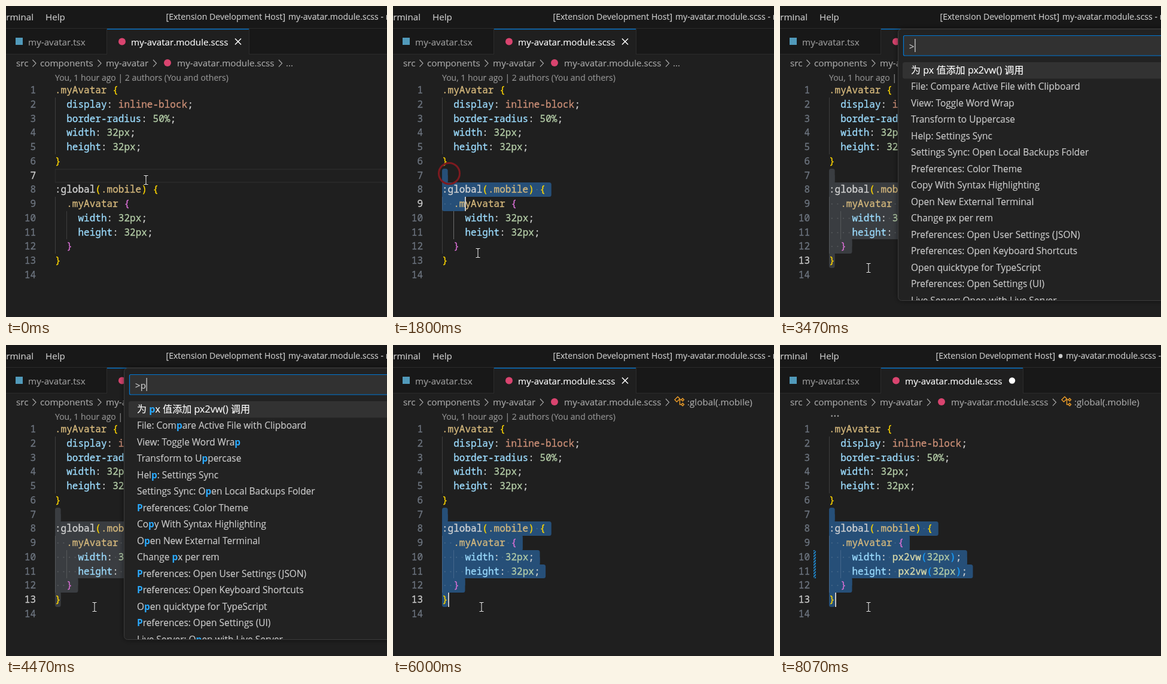
An HTML page for the animation above (8610 ms loop, 637 by 520 pixels).

```html
<!DOCTYPE html>
<html lang="en">
<head>
<meta charset="utf-8">
<title>Command palette demo</title>
<style>
  html, body { margin: 0; width: 100%; height: 100%; overflow: hidden; background: #1f1f1f; }
  svg { display: block; }
  text { white-space: pre; font-family: "Open Sans", "Noto Sans CJK SC", "Noto Sans CJK", sans-serif; font-size: 15.2px; stroke-width: .15px; }
  .code { font-family: "Noto Sans Mono", monospace; font-size: 16.03px; stroke-width: .3px; }
  .hit { fill: #2aaaff; stroke: none; font-weight: 700; }
</style>
</head>
<body>
<svg id="stage" width="637" height="520" viewBox="0 0 637 520">
  <defs>
    <pattern id="stripes" width="3.4" height="3.4" patternUnits="userSpaceOnUse" patternTransform="rotate(-45)">
      <rect width="3.4" height="1.9" fill="#1f8ad2"/>
    </pattern>
    <filter id="shadow" x="-10%" y="-10%" width="120%" height="125%">
      <feDropShadow dx="0" dy="0" stdDeviation="5" flood-color="#000" flood-opacity=".5"/>
    </filter>
  </defs>
  <g id="view"></g>
</svg>
<script>
const LOOP = 8610, LEFT = 82, TOP = 129.15, CHAR = 9.62, LINE = 23.75;
const view = document.getElementById('view');

const source = `.myAvatar {
  display: inline-block;
  border-radius: 50%;
  width: 32px;
  height: 32px;
}

:global(.mobile) {
  .myAvatar {
    width: 32px;
    height: 32px;
  }
}
`;
const before = source.split('\n');
const after = before.map((line, i) => i > 7 ? line.replace('32px', 'px2vw(32px)') : line);

const commands = [
  '为 px 值添加 px2vw() 调用', 'File: Compare Active File with Clipboard', 'View: Toggle Word Wrap',
  'Transform to Uppercase', 'Help: Settings Sync', 'Settings Sync: Open Local Backups Folder',
  'Preferences: Color Theme', 'Copy With Syntax Highlighting', 'Open New External Terminal',
  'Change px per rem', 'Preferences: Open User Settings (JSON)', 'Preferences: Open Keyboard Shortcuts',
  'Open quicktype for TypeScript', 'Preferences: Open Settings (UI)', 'Live Server: Open with Live Server'
];
const pxCommands = [
  commands[0], 'Change px per rem', '将光标移动到 px2vw() 的括号中',
  'Convert px to rem', 'Convert px to rem in File', 'Convert rem to px'
];

// Pointer positions while dragging: time, x, y
const drag = [
  [1470, 94, 280], [1530, 95, 281], [1600, 98, 286], [1670, 108, 305], [1730, 121, 336], [1800, 142, 413],
  [1870, 148, 436], [1930, 150, 444], [2000, 151, 449], [2070, 151, 451], [2130, 150, 452],
  [2470, 149, 445], [2600, 148, 438]
];
const typed = [[3470, ''], [4470, 'p'], [4530, 'px'], [4800, 'px2'], [5070, 'px2v'], [5200, 'px2vw']];
const caretOn = [[270, 770], [1270, 3000], [6000, 6530], [7000, 7530], [8070, LOOP]];

const within = (t, from, to) => t >= from && t < to;
const rowTop = row => Math.round(TOP + (row - 1) * LINE);
const colX = col => LEFT + col * CHAR;
const esc = s => s.replace(/&/g, '&amp;').replace(/</g, '&lt;').replace(/>/g, '&gt;');
const rect = (x, y, w, h, fill, extra = '') => `<rect x="${x}" y="${y}" width="${w}" height="${h}" fill="${fill}" ${extra}/>`;
const text = (x, y, s, fill, extra = '') => `<text x="${x}" y="${y}" fill="${fill}" stroke="${fill}" ${extra}>${esc(s)}</text>`;
const disc = (x, y, r, fill) => `<circle cx="${x}" cy="${y}" r="${r}" fill="${fill}"/>`;
const stroke = (d, color, width = 1.2) => `<path d="${d}" fill="none" stroke="${color}" stroke-width="${width}"/>`;
const size = px => `style="font-size:${px}px"`;

function pointer(t) {
  if (t < 1470) {
    const step = Math.floor((t - 200) / 66.6) + 1;
    const u = Math.min(1, Math.max(0, step / 10));
    const p = u * u * (3 - 2 * u);
    return [234 - 140 * p, 291 - 11 * p - 13 * Math.sin(Math.PI * p)];
  }
  return drag.filter(d => d[0] <= t).pop().slice(1);
}

// The selection trails the pointer by one step.
function selectionHead(t, lines) {
  if (t < 1470) return { row: 7, col: 0 };
  if (t >= 2470) return { row: 13, col: 1 };
  const passed = drag.filter(d => d[0] <= t);
  const [, x, y] = passed[Math.max(0, passed.length - 2)];
  const row = Math.min(14, Math.floor((y - TOP) / LINE) + 1);
  return { row, col: Math.min(lines[row - 1].length, Math.round((x - LEFT) / CHAR)) };
}

function header(t) {
  const dirty = t >= 6130;
  const symbol = within(t, 2000, 2130) || t >= 2530;
  const grey = '#a9a9a9';
  let out = rect(0, 0, 637, 80, '#181818') + rect(0, 37, 637, 1, '#2b2b2b') + rect(0, 80, 637, 1, '#2b2b2b')
    + rect(168, 38, 239, 43, '#2b2b2b') + rect(169, 38, 237, 43, '#1f1f1f') + rect(169, 38, 237, 1.3, '#0078d4');
  out += text(46, 24, 'Terminal', '#cccccc', 'text-anchor="end"') + text(66, 24, 'Help', '#cccccc')
    + text(dirty ? 260.5 : 267.5, 23, '[Extension Development Host]', '#cccccc', size(14.1))
    + text(dirty ? 478 : 472, 23, 'my-avatar.module.scss - m', '#cccccc', size(14.1));
  if (dirty) out += disc(469, 18.5, 3.4, '#cccccc');
  out += rect(16, 53, 12, 12, '#519aba') + text(37, 66, 'my-avatar.tsx', '#9d9d9d')
    + disc(194, 59.5, 6, '#d9446f') + text(209, 66, 'my-avatar.module.scss', '#ffffff');
  out += t >= 6070 ? disc(388, 59.5, 5.2, '#ffffff') : stroke('M383 54.5l10 10m0-10l-10 10', '#ffffff', 1.5);
  out += text(17, 101, 'src', grey) + text(57, 101, 'components', grey) + text(167, 101, 'my-avatar', grey)
    + disc(270, 95, 6, '#d9446f') + text(286, 101, 'my-avatar.module.scss', grey);
  for (const x of [44.5, 153.5, 246, 456]) out += stroke(`M${x} 90l5.5 5.8l-5.5 5.8`, grey, 1.2);
  if (symbol) {
    out += stroke('M471 91.5l5-5 3.5 3.5-5 5zM478 91.5h5M479.5 91.5v8h3.5M482 91.5l2.2-2.2 2.3 2.3-2.2 2.2zM482 99.5l2.2-2.2 2.3 2.3-2.2 2.2z', '#ee9d28', 1.4)
      + text(492, 101, ':global(.mobile)', grey);
  } else {
    out += text(468, 101, '...', grey);
  }
  return out + (t < 6670
    ? text(82, 125, 'You, 1 hour ago | 2 authors (You and others)', '#949494', size(14))
    : text(84, 120, '…', '#999999', size(20)));
}

function tokenColor(token) {
  if (token[0] === '.') return '#d7ba7d';
  if (/^\d/.test(token)) return '#b5cea8';
  if (token === 'px2vw') return '#dcdcaa';
  if (token === 'inline-block') return '#ce9178';
  return /^[a-z]/.test(token) ? '#9cdcfe' : '#d4d4d4';
}

function codeText(lines, activeRow) {
  const brackets = ['#ffd700', '#da70d6', '#179fff'];
  let depth = 0, out = '';
  lines.forEach((line, i) => {
    const y = rowTop(i + 1) + 17;
    out += text(50, y, String(i + 1), i + 1 === activeRow ? '#cccccc' : '#6e7681', 'class="code" text-anchor="end"');
    for (const { 0: token, index } of line.matchAll(/:global|\.\w+|\d+(?:px|%)|[a-z][\w-]*|\S/g)) {
      let color = tokenColor(token);
      if ('{('.includes(token)) color = brackets[depth++];
      if ('})'.includes(token)) color = brackets[--depth];
      out += text(colX(index), y, token, color, 'class="code"');
    }
  });
  return out;
}

function selection(lines, head, color) {
  let out = '', dots = '', previous = 0;
  for (let row = 7; row <= head.row; row++) {
    const line = lines[row - 1];
    const cols = row < head.row ? line.length + 1 : head.col;
    const w = cols * CHAR, y = rowTop(row);
    if (w) out += rect(LEFT, y, w, rowTop(row + 1) - y, color, 'rx="3.5"');
    const joint = Math.min(w, previous);
    if (joint) out += rect(LEFT, y - 12, joint, 24, color);
    previous = w;
    [...line.slice(0, cols)].forEach((c, i) => {
      if (c === ' ') dots += disc(colX(i + .5), y + 12, 1.1, 'rgba(227,228,226,.16)');
    });
  }
  return out + dots;
}

function guides(activeRow) {
  const guide = (col, from, to, active) =>
    rect(Math.round(colX(col)), rowTop(from), 1, rowTop(to + 1) - rowTop(from), `rgba(255,255,255,${active ? .35 : .14})`);
  return guide(0, 2, 5) + guide(0, 9, 12) + guide(2, 10, 11, within(activeRow, 9, 13));
}

function editor(t, paletteOpen) {
  const lines = t >= 6070 ? after : before;
  const head = selectionHead(t, lines);
  const y = rowTop(head.row);
  let out = '';
  if (t < 1470) out += rect(LEFT + .5, y + 1, 600, LINE - 2, 'none', 'stroke="#2a2a2a" stroke-width="1.6"');
  else out += selection(lines, head, paletteOpen ? '#3a3d41' : '#264f78');
  out += guides(head.row) + codeText(lines, head.row);
  if (t >= 6400) out += rect(56, rowTop(10), 4, rowTop(12) - rowTop(10), 'url(#stripes)');
  if (!paletteOpen && caretOn.some(([from, to]) => within(t, from, to))) {
    out += rect(Math.round(colX(head.col)), y, 2, rowTop(head.row + 1) - y, '#c8c8c8');
  }
  return out;
}

function mouse(t) {
  const [x, y] = pointer(t);
  const beam = 'M-3.5-7.5h2.5L0-6.5 1-7.5H3.5M0-6.5V6.5M-3.5 7.5h2.5L0 6.5 1 7.5H3.5';
  const ring = within(t, 1470, 1930)
    ? '<circle cx="94" cy="280" r="17.5" fill="none" stroke="#7d1a1f" stroke-width="3"/>' : '';
  return ring + `<g transform="translate(${x.toFixed(1)} ${y.toFixed(1)})">`
    + stroke(beam, '#111111', 2.6) + stroke(beam, '#f0f0f0', 1.1) + '</g>';
}

function commandRow(label, query, i) {
  const at = query ? label.toLowerCase().indexOf(query) : -1;
  const end = at + query.length;
  const body = at < 0 ? esc(label)
    : `${esc(label.slice(0, at))}<tspan class="hit">${label.slice(at, end)}</tspan>${esc(label.slice(end))}`;
  const px = /^[A-Z]/.test(label) ? 15.45 : 16.1;
  const color = i ? '#cccccc' : '#ffffff';
  return `<text x="219" y="${Math.floor(113 + i * 27.5)}" fill="${color}" stroke="${color}" ${size(px)}>${body}</text>`;
}

function palette(t) {
  const query = typed.filter(k => k[0] <= t).pop()[1];
  const list = query.length < 2 ? commands : pxCommands.filter(c => c.includes(query));
  const bottom = list.length > 14 ? 492.5 : 100 + list.length * 27.5;
  const prompt = '>' + query;
  let out = rect(197.5, 38.5, 480, bottom - 38.5, '#222222', 'rx="6" stroke="#3c3c3c" filter="url(#shadow)"')
    + rect(206.5, 49.5, 460, 33.5, '#313131', 'rx="2" stroke="#0078d4" stroke-width="1.2"')
    + text(216, 73, prompt, '#cccccc', 'id="prompt"')
    + rect(205, 94, 460, 27.5, '#323232', 'rx="3.5"');
  if (!within(t, 4130, 4470) && !within(t, 5730, 6000)) out += '<rect id="inputCaret" y="55" width="1.2" height="22" fill="#d8d8d8"/>';
  return out + `<clipPath id="listClip"><rect x="198" y="88" width="440" height="${bottom - 88.5}"/></clipPath>`
    + `<g clip-path="url(#listClip)">${list.map((label, i) => commandRow(label, query, i)).join('')}</g>`;
}

let shown = '';
function draw(t) {
  const paletteOpen = within(t, 3470, 6000);
  const markup = header(t) + editor(t, paletteOpen) + mouse(t) + (paletteOpen ? palette(t) : '');
  if (markup === shown) return;
  view.innerHTML = shown = markup;
  const caret = document.getElementById('inputCaret');
  if (caret) caret.setAttribute('x', 216.6 + document.getElementById('prompt').getComputedTextLength());
}

const start = performance.now();
function tick() {
  draw((performance.now() - start) % LOOP);
  requestAnimationFrame(tick);
}
tick();
</script>
</body>
</html>
```
